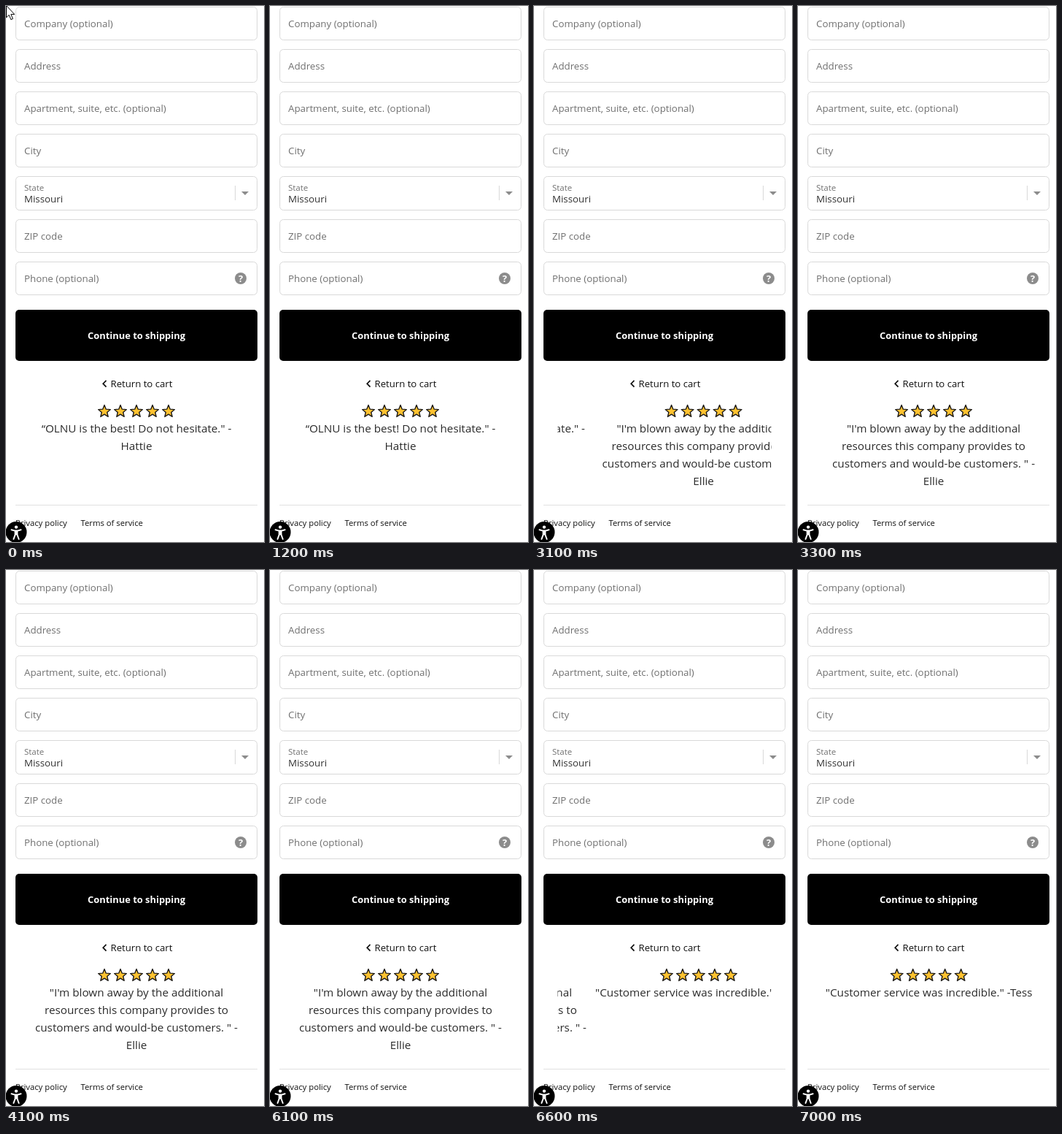
An HTML page that plays this animation: 354x734 px, repeating every 7200 ms.

```html
<!DOCTYPE html>
<html lang="en">
<head>
<meta charset="utf-8">
<title>Checkout form</title>
<style>
  html, body { margin: 0; height: 100%; overflow: hidden; background: #fff; }
  svg { display: block; width: 100%; height: 100%; }
  text { font: 13.3px "Open Sans", "Noto Sans", sans-serif; fill: #707070; }
  .field { fill: #fff; stroke: #d9d9d9; }
  .dark { fill: #333; }
  .small { font-size: 11.5px; }
  .link { font-size: 13.2px; fill: #111; }
  .footer { font-size: 11.3px; fill: #111; }
  .button { font-size: 12.9px; font-weight: 700; fill: #fff; text-anchor: middle; }
  .quote { font-size: 15.25px; fill: #2b2b2b; text-anchor: middle; }
  .star { fill: #ffc230; stroke: #1c1a17; stroke-width: 1.4; stroke-linejoin: round; }
</style>
</head>
<body>
<svg viewBox="0 0 354 734">
  <defs><clipPath id="viewport"><rect x="32.5" y="540" width="293" height="125"/></clipPath></defs>

  <g id="fields"></g>
  <text class="small" x="25" y="253">State</text>
  <text class="dark" x="25" y="269">Missouri</text>
  <path d="M314.5 246v20" stroke="#d9d9d9"/>
  <path d="M323 254h10l-5 5z" fill="#8c8c8c"/>
  <circle cx="322" cy="373" r="8" fill="#8c8c8c"/>
  <text class="button" x="322" y="377.8">?</text>

  <rect x="13" y="416" width="332" height="70" rx="5"/>
  <text class="button" x="179" y="456">Continue to shipping</text>
  <path d="M137.5 512.8l-4.3 4.4 4.3 4.4" fill="none" stroke="#111" stroke-width="1.7"/>
  <text class="link" x="143.5" y="522">Return to cart</text>

  <g clip-path="url(#viewport)"><g id="slides"></g></g>

  <path d="M13 683.5h332" stroke="#e1e1e1"/>
  <text class="footer" x="13" y="712">Privacy policy</text>
  <text class="footer" x="102.5" y="712">Terms of service</text>

  <circle cx="14" cy="720.5" r="14.5"/>
  <path d="M7.5 717.2l4.7 1.4h3.6l4.7-1.4M14 719v4.5M12.6 719v5l-2.2 6M15.4 719v5l2.2 6"
    fill="none" stroke="#fff" stroke-width="2" stroke-linecap="round" stroke-linejoin="round"/>
  <circle cx="14" cy="713.6" r="2.2" fill="#fff"/>

  <path id="cursor" d="M.5-.5v16.3l3.7-3.5 2.6 6.3 2.6-1.1-2.6-6.1h4.9z" fill="#fff" stroke="#000"/>
</svg>
<script>
const LOOP = 7200, SLIDE_WIDTH = 293, CENTER = 179;
const SLIDE_STARTS = [2852, 6338];
const SPRING = 0.0125; // angular rate per ms, critically damped
const byId = id => document.getElementById(id);

const STATE_ROW = 4; // one pixel taller than the other rows
const labels = ["Company (optional)", "Address", "Apartment, suite, etc. (optional)",
  "City", "", "ZIP code", "Phone (optional)"];
byId("fields").innerHTML = labels.map((label, i) => {
  const y = 58 * i + (i > STATE_ROW ? 1 : 0);
  const height = i === STATE_ROW ? 46 : 45;
  return `<rect class="field" x="13.5" y="${y + 1.5}" width="331" height="${height}" rx="5"/>
    <text x="25" y="${y + 29}">${label}</text>`;
}).join("");

const quotes = [
  ["“OLNU is the best! Do not hesitate.\" -", "Hattie"],
  ["\"I'm blown away by the additional", "resources this company provides to",
    "customers and would-be customers. \" -", "Ellie"],
  ["\"Customer service was incredible.\" -Tess"]
];

function star(cx, cy) {
  const points = Array.from({ length: 10 }, (_, i) => {
    const angle = i * Math.PI / 5, r = i % 2 ? 3.9 : 8.8;
    return [cx + r * Math.sin(angle), cy - r * Math.cos(angle)].map(v => v.toFixed(2));
  });
  return `<polygon class="star" points="${points.join(" ")}"/>`;
}

byId("slides").innerHTML = quotes.map((lines, i) => {
  const x = CENTER + i * SLIDE_WIDTH;
  const stars = [-2, -1, 0, 1, 2].map(n => star(x + 22 * n, 555.3)).join("");
  const text = lines.map((line, n) =>
    `<text class="quote" x="${x}" y="${584 + 24 * n}">${line}</text>`).join("");
  return stars + text;
}).join("");

function springProgress(elapsed) {
  const u = SPRING * Math.max(0, elapsed);
  return 1 - (1 + u) * Math.exp(-u);
}

function draw(now) {
  const t = now % LOOP;
  const position = SLIDE_STARTS.reduce((sum, start) => sum + springProgress(t - start), 0);
  byId("slides").setAttribute("transform", `translate(${-position * SLIDE_WIDTH})`);
  byId("cursor").setAttribute("visibility", t < 300 ? "visible" : "hidden");
}

const begin = performance.now();
(function tick() {
  draw(performance.now() - begin);
  requestAnimationFrame(tick);
})();
</script>
</body>
</html>
```
